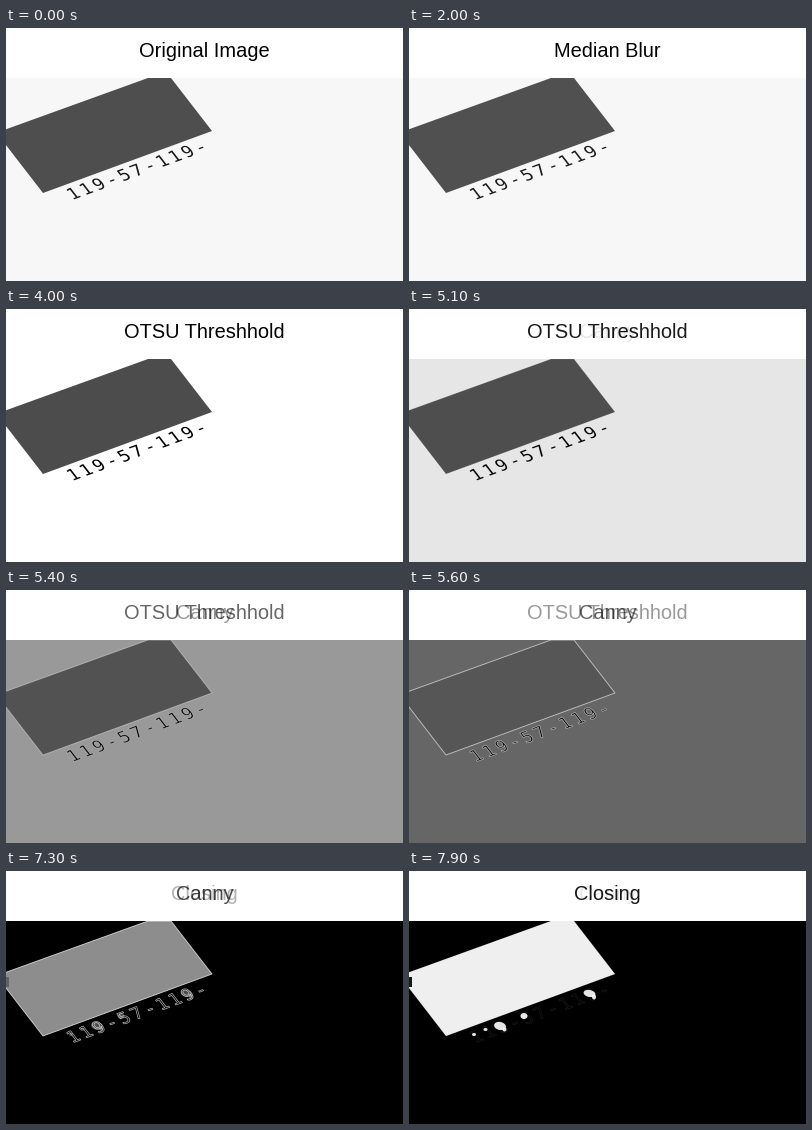
These frames come from a looping animation (397x253 px, 8 s). A matplotlib script:

```python
import numpy as np
import matplotlib.pyplot as plt
from matplotlib.animation import FuncAnimation
from matplotlib.patches import Ellipse, PathPatch, Polygon, Rectangle
from matplotlib.textpath import TextPath
from matplotlib.transforms import Affine2D

W, H, DPI = 397, 253, 64
PX = 72 / DPI          # points per pixel
STEP = 100             # ms per frame
HOLD, FADE = 1000, 1000

TITLES = ["Original Image", "Median Blur", "OTSU Threshhold", "Canny", "Closing"]

# Grey level of each part, per processing stage
BACK = [247, 247, 255, 0, 0]
LABEL = [78, 80, 76, 92, 255]
DIGITS = [25, 30, 0, 0, 0]
EDGES = [0, 0, 0, 1, 0]     # opacity of the outlines
BLOBS = [0, 0, 0, 0, 1]     # opacity of the closed regions

fig = plt.figure(figsize=(W / DPI, H / DPI), dpi=DPI, facecolor="white")
ax = fig.add_axes([0, 0, 1, 1])
ax.set_xlim(0, W)
ax.set_ylim(H, 0)
ax.axis("off")

photo = ax.add_patch(Rectangle((0, 50), W, H - 50, lw=0))

# Plain slab where the printed label lies
corners = [(-2, 102), (142, 50), (165, 50), (206, 103), (37, 165), (-2, 114.5)]
slab = ax.add_patch(Polygon(corners, lw=0))
rim = ax.add_patch(Polygon(corners, fill=False, ec="white", lw=0.9 * PX))
for patch in (slab, rim):
    patch.set_clip_path(photo)

# Digits lie in the slanted plane of the label
SIZE = 17.5
along = np.array([169, -62]) / np.hypot(169, 62)
up = np.array([-41, -53]) / np.hypot(41, 53)
start, pitch = np.array([71, 170.3]), 13.53

fills, lines = [], []
for i, char in enumerate("119-57-119-"):
    glyph = TextPath((-0.301 * SIZE, 0), char, size=SIZE,
                     prop={"family": "DejaVu Sans Mono"})
    x, y = start + i * pitch * along
    plane = Affine2D([[along[0], up[0], x], [along[1], up[1], y], [0, 0, 1]])
    path = glyph.transformed(plane)
    fills.append(ax.add_patch(PathPatch(path, lw=0)))
    lines.append(ax.add_patch(
        PathPatch(path, fill=False, ec="white", lw=0.7 * PX)))
lines.append(rim)


def blob(x, y, w, h, angle=0):
    return ax.add_patch(Ellipse((x, y), w, h, angle=angle, fc="white", lw=0))


closed = [
    blob(91, 155, 12, 8, 12), blob(95.5, 158.5, 4, 4),
    blob(180.5, 122.5, 12, 7, 12), blob(185, 126, 4, 5),
    blob(115, 145, 7, 6), blob(65, 163.5, 4, 3), blob(76.5, 158.5, 4, 3),
]
notch = ax.add_patch(Rectangle((0, 106), 3, 10, fc="black", lw=0))
closed.append(notch)

heads = [
    ax.text(W / 2, 29, title, ha="center", va="baseline", color="black",
            family="Liberation Sans", fontsize=20 * PX)
    for title in TITLES
]


def draw(frame):
    stage, ms = divmod(frame * STEP, HOLD + FADE)
    mix = max(0, ms - HOLD) / FADE

    def blend(levels):
        return (1 - mix) * levels[stage] + mix * levels[stage + 1]

    def grey(levels):
        return (blend(levels) / 255,) * 3

    photo.set_facecolor(grey(BACK))
    slab.set_facecolor(grey(LABEL))
    for patch in fills:
        patch.set_facecolor(grey(DIGITS))
    for patch in lines:
        patch.set_alpha(blend(EDGES))
    for patch in closed:
        patch.set_alpha(blend(BLOBS))
    for i, head in enumerate(heads):
        head.set_alpha(blend([float(i == s) for s in range(len(TITLES))]))
    return [photo, slab, *fills, *lines, *closed, *heads]


anim = FuncAnimation(fig, draw, frames=80, interval=STEP,
                     repeat=True, repeat_delay=0, blit=False)
plt.show()
```
